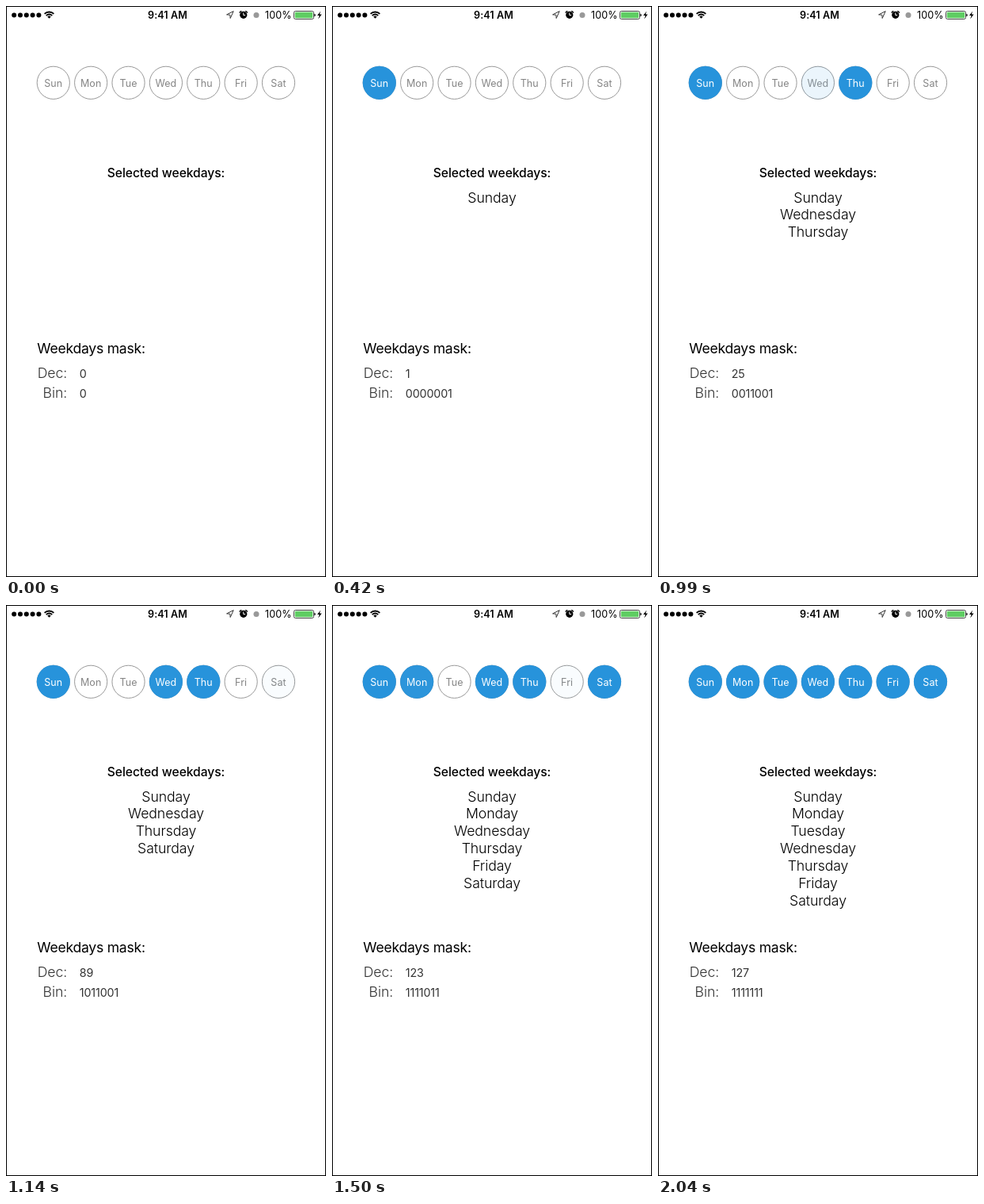
Animation of 404x720 px, one loop 2100 ms. Source, as an HTML page with a canvas:

```html
<!DOCTYPE html>
<html lang="en">
<head>
<meta charset="utf-8">
<title>Weekday picker</title>
<style>
html, body { margin: 0; width: 100%; height: 100%; overflow: hidden; background: #fff; }
canvas { display: block; width: 404px; height: 720px; }
</style>
</head>
<body>
<canvas id="stage"></canvas>
<script>
const W = 404, H = 720, LOOP = 2100, TICK = 30, FADE = 210;
const BLUE = '#2793db';
const DAYS = ['Sunday', 'Monday', 'Tuesday', 'Wednesday', 'Thursday', 'Friday', 'Saturday'];
// Tap time of each day, Sunday first
const TAPS = [180, 1312, 1665, 945, 575, 1476, 1116];

const canvas = document.getElementById('stage');
const ctx = canvas.getContext('2d');
const dpr = window.devicePixelRatio || 1;
canvas.width = W * dpr;
canvas.height = H * dpr;

function text(str, x, y, size, { weight = 400, color = '#000', align = 'left', gap = 0 } = {}) {
  ctx.font = `${weight} ${size}px Inter, "Open Sans", sans-serif`;
  ctx.letterSpacing = gap + 'px';
  ctx.textAlign = align;
  ctx.fillStyle = color;
  ctx.fillText(str, x, y);
}

function disc(x, y, r, color) {
  ctx.beginPath();
  ctx.arc(x, y, r, 0, Math.PI * 2);
  ctx.fillStyle = color;
  ctx.fill();
}

function ring(x, y, r, color, width) {
  ctx.beginPath();
  ctx.arc(x, y, r, 0, Math.PI * 2);
  ctx.strokeStyle = color;
  ctx.lineWidth = width;
  ctx.stroke();
}

function path(points, closed) {
  ctx.beginPath();
  points.forEach(([x, y]) => ctx.lineTo(x, y));
  if (closed) ctx.closePath();
}

function line(points, color, width, closed) {
  path(points, closed);
  ctx.strokeStyle = color;
  ctx.lineWidth = width;
  ctx.stroke();
}

function wifi(x, y) {
  const a = Math.PI * 0.25;
  ctx.strokeStyle = '#000';
  ctx.lineWidth = 1.8;
  for (const r of [8.3, 5.3]) {
    ctx.beginPath();
    ctx.arc(x, y, r, -Math.PI + a, -a);
    ctx.stroke();
  }
  ctx.beginPath();
  ctx.moveTo(x, y);
  ctx.arc(x, y, 3.2, -Math.PI + a, -a);
  ctx.fillStyle = '#000';
  ctx.fill();
}

function alarm(x, y) {
  disc(x, y, 4.6, '#000');
  line([[x - 5.2, y - 2.8], [x - 2.6, y - 5]], '#000', 1.5);
  line([[x + 5.2, y - 2.8], [x + 2.6, y - 5]], '#000', 1.5);
  line([[x, y - 2.8], [x, y + 0.3], [x + 2.4, y + 0.3]], '#fff', 1);
}

function battery() {
  ctx.beginPath();
  ctx.roundRect(363.5, 6.5, 25, 10, 2);
  ctx.strokeStyle = '#333';
  ctx.lineWidth = 0.9;
  ctx.stroke();
  ctx.beginPath();
  ctx.roundRect(364.8, 7.8, 22.4, 7.4, 1);
  ctx.fillStyle = '#5fcd63';
  ctx.fill();
  ctx.beginPath();
  ctx.arc(389.2, 11.5, 1.7, -Math.PI / 2, Math.PI / 2);
  ctx.fillStyle = '#333';
  ctx.fill();
  path([[397.2, 6.5], [393, 12.1], [395.6, 12.1], [394.2, 16.5], [398.6, 10.6], [395.9, 10.6]], true);
  ctx.fillStyle = '#000';
  ctx.fill();
}

function statusBar() {
  for (let i = 0; i < 5; i++) disc(10.2 + i * 7.8, 11.5, 3, '#000');
  wifi(54.5, 15.8);
  text('9:41 AM', 204, 15.6, 12.6, { weight: 600, align: 'center', gap: 0.1 });
  line([[287.2, 6.6], [278.6, 10.9], [282.8, 11.2], [283.2, 15.5]], '#333', 1, true);
  alarm(299.8, 11.3);
  disc(316, 11.5, 3.5, '#999');
  text('100%', 327, 15.7, 12.6, { gap: 0.1 });
  battery();
}

function ease(u) {
  u = Math.min(1, Math.max(0, u));
  return u < 0.5 ? 2 * u * u : 1 - 2 * (1 - u) * (1 - u);
}

function dayButton(i, on) {
  const x = 59.8 + i * 47.37, y = 96.8;
  const label = color => text(DAYS[i].slice(0, 3), x, 101.5, 12.5, { color, align: 'center', gap: 0.1 });
  ring(x, y, 20.6, '#999', 1);
  label('#858585');
  if (on > 0) {
    ctx.globalAlpha = on;
    disc(x, y, 21.1, BLUE);
    label('#fff');
    ctx.globalAlpha = 1;
  }
}

function draw(t) {
  ctx.setTransform(dpr, 0, 0, dpr, 0, 0);
  ctx.fillStyle = '#fff';
  ctx.fillRect(0, 0, W, H);
  statusBar();

  let mask = 0, row = 0;
  text('Selected weekdays:', 202, 215.5, 15.7, { weight: 500, align: 'center', gap: -0.08 });
  DAYS.forEach((day, i) => {
    const since = t - TAPS[i];
    dayButton(i, ease(since / FADE));
    if (since < 0) return;
    mask |= 1 << i;
    text(day, 202, 247.5 + row++ * 21.87, 17.7, { weight: 300, align: 'center', gap: -0.1 });
  });

  text('Weekdays mask:', 39.2, 438.3, 17.6, { gap: -0.25 });
  const name = { weight: 300, color: '#333', align: 'right', gap: -0.05 };
  text('Dec:', 77.3, 469.3, 17.7, name);
  text('Bin:', 77.3, 493.6, 17.7, name);
  const value = { weight: 400, color: '#333', gap: -0.15 };
  text(String(mask), 92.8, 469.2, 14.3, value);
  text(mask ? mask.toString(2).padStart(7, '0') : '0', 92.8, 493.6, 14.3, value);

  ctx.strokeStyle = '#000';
  ctx.lineWidth = 1;
  ctx.strokeRect(0.5, 0.5, W - 1, H - 1);
}

const start = performance.now();
function frame() {
  const t = (performance.now() - start) % LOOP;
  draw(Math.floor(t / TICK) * TICK);
  requestAnimationFrame(frame);
}
frame();
</script>
</body>
</html>
```
